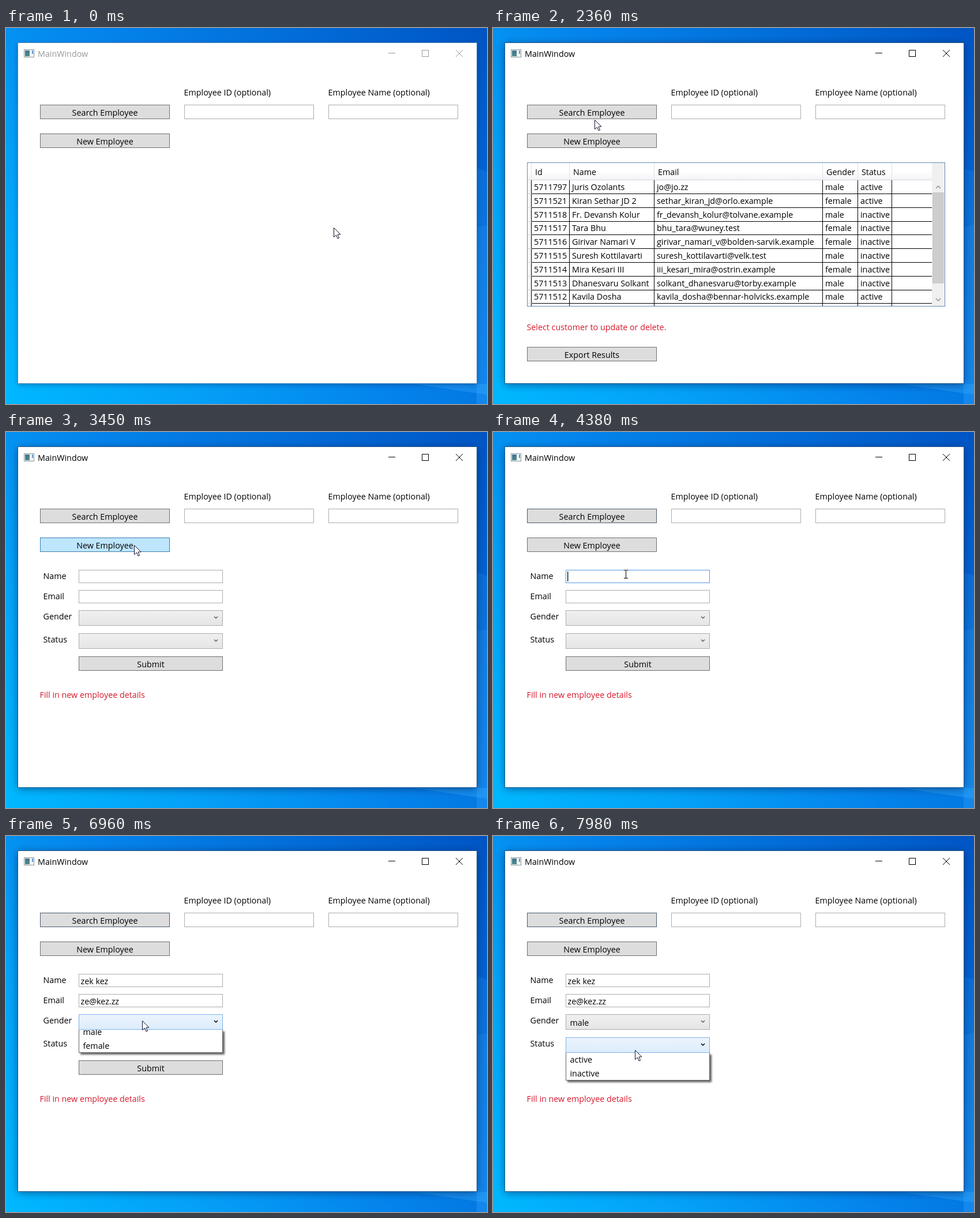
These frames come from a looping animation (834x652 px, 8 s). An HTML page with a canvas:

```html
<!DOCTYPE html>
<html lang="en">
<head>
<meta charset="utf-8">
<title>MainWindow</title>
<style>
html, body { margin: 0; width: 100%; height: 100%; overflow: hidden; }
canvas { display: block; }
</style>
</head>
<body>
<canvas id="stage" width="834" height="652"></canvas>
<script>
const ctx = document.getElementById('stage').getContext('2d');
const LOOP = 8000;
const RED = '#d6182b', GREY = '#707070';

// Pointer moves: start, end, steps, control point (or null), end point.
const START = [568, 346];
const MOVES = [
  [70, 620, 8, [400, -225], [160, 140]],
  [2360, 2710, 6, null, [220, 214]],
  [2910, 3050, 3, null, [222, 196]],
  [3980, 4260, 5, null, [230, 247]],
  [4790, 5130, 5, null, [236, 286]],
  [6420, 6490, 2, null, [236, 320]],
  [7030, 7160, 3, null, [240, 372]],
  [7230, 7300, 2, null, [241, 348]],
  [7500, 7700, 4, null, [246, 371]]
];
const SEARCH = [59, 133, 225, 25], CREATE = [59, 183, 225, 25];
const ID_BOX = [309, 133, 225, 25], NAME_FILTER = [559, 133, 225, 25];
const NAME = [126, 239, 250, 23], EMAIL = [126, 274, 250, 23];
const GENDER = [126, 309, 250, 27], STATUS = [126, 349, 250, 27];

const EMAIL_KEYS = [5420, 5500, 5580, 5660, 5740, 5940, 6010, 6220, 6290];
const COLUMNS = [132, 279, 571, 632, 691];
const TEXT_X = [71, 137, 284, 576, 637];
const ROWS = [
  [5711797, 'Juris Ozolants', 'jo@jo.zz', 'male', 'active'],
  [5711521, 'Kiran Sethar JD 2', 'sethar_kiran_jd@orlo.example', 'female', 'active'],
  [5711518, 'Fr. Devansh Kolur', 'fr_devansh_kolur@tolvane.example', 'male', 'inactive'],
  [5711517, 'Tara Bhu', 'bhu_tara@wuney.test', 'female', 'inactive'],
  [5711516, 'Girivar Namari V', 'girivar_namari_v@bolden-sarvik.example', 'female', 'inactive'],
  [5711515, 'Suresh Kottilavarti', 'suresh_kottilavarti@velk.test', 'male', 'inactive'],
  [5711514, 'Mira Kesari III', 'iii_kesari_mira@ostrin.example', 'female', 'inactive'],
  [5711513, 'Dhanesvaru Solkant', 'solkant_dhanesvaru@torby.example', 'male', 'inactive'],
  [5711512, 'Kavila Dosha', 'kavila_dosha@bennar-holvicks.example', 'male', 'active']
];

let pointer;

function pointerAt(t) {
  let from = START;
  for (const [start, end, steps, control, to] of MOVES) {
    if (t < start) break;
    const step = Math.min(steps, Math.floor((t - start) / (end - start) * (steps - 1)) + 1);
    const u = Math.sin(step / steps * Math.PI / 2), v = 1 - u;
    const mid = control || from.map((p, i) => (p + to[i]) / 2);
    from = from.map((p, i) => Math.round(v * v * p + 2 * u * v * mid[i] + u * u * to[i]));
  }
  const hidden = (t >= 4450 && t < 4790) || (t >= 5420 && t < 6420);
  return { x: from[0], y: from[1], hidden };
}

function over([x, y, w, h]) {
  return !pointer.hidden && pointer.x >= x && pointer.x < x + w && pointer.y >= y && pointer.y < y + h;
}

function gradient(x0, y0, x1, y1, ...colors) {
  const g = ctx.createLinearGradient(x0, y0, x1, y1);
  colors.forEach((c, i) => g.addColorStop(i / (colors.length - 1), c));
  return g;
}

function rect(x, y, w, h, fill) {
  ctx.fillStyle = fill;
  ctx.fillRect(x, y, w, h);
}

function frame([x, y, w, h], fill, border) {
  rect(x, y, w, h, border);
  rect(x + 1, y + 1, w - 2, h - 2, fill);
}

function text(value, x, y, color = '#000', align = 'left') {
  ctx.fillStyle = color;
  ctx.textAlign = align;
  ctx.fillText(value, x, y);
}

function shape(points, stroke, width = 1, fill) {
  ctx.beginPath();
  points.forEach(([x, y]) => ctx.lineTo(x, y));
  if (fill) {
    ctx.closePath();
    ctx.fillStyle = fill;
    ctx.fill();
  }
  if (stroke) {
    ctx.strokeStyle = stroke;
    ctx.lineWidth = width;
    ctx.stroke();
  }
}

function chevron(x, y, size, color, width) {
  shape([[x - Math.abs(size), y - size / 2], [x, y + size / 2], [x + Math.abs(size), y - size / 2]], color, width);
}

function button(box, label, pressed, border = GREY) {
  const hover = over(box);
  frame(box, pressed ? '#c4e5f6' : hover ? '#bee6fd' : '#ddd',
    pressed ? '#2c628b' : hover ? '#3c7fb1' : border);
  text(label, box[0] + box[2] / 2, box[1] + 19, '#000', 'center');
}

function textBox(box, value = '', focused = false) {
  const [x, y] = box;
  frame(box, '#fff', focused ? '#569de5' : over(box) ? '#7eb4ea' : '#abadb3');
  text(value, x + 3.5, y + 17.5);
  if (focused) rect(x + 3 + ctx.measureText(value).width, y + 3, 1.3, 17, '#000');
}

function comboBox(box, value = '') {
  const [x, y, w, h] = box, hover = over(box);
  const fill = hover ? gradient(0, y, 0, y + h, '#ecf4fc', '#dcecfc')
                     : gradient(0, y, 0, y + h, '#f0f0f0', '#e5e5e5');
  frame(box, fill, hover ? '#7eb4ea' : '#acacac');
  chevron(x + 238, y + 12.5, 3, hover ? '#000' : '#606060', 1.5);
  text(value, x + 7.5, y + 20);
}

// The list slides down from under its combo box.
function popup([x, y, w, h], items, t, opened) {
  const shown = Math.min(48, Math.floor((t - opened) / 70) * 20);
  if (shown <= 0) return;
  const top = y + h;
  ctx.save();
  ctx.beginPath();
  ctx.rect(x, top, w + 8, shown + 8);
  ctx.clip();
  ctx.shadowColor = 'rgba(0,0,0,.6)';
  ctx.shadowBlur = 3;
  ctx.shadowOffsetX = ctx.shadowOffsetY = 3;
  rect(x, top, w, shown, '#646464');
  ctx.restore();
  ctx.save();
  ctx.beginPath();
  ctx.rect(x + 1, top, w - 2, shown - 1);
  ctx.clip();
  rect(x, top, w, shown, '#fff');
  items.forEach((item, i) => {
    const itemTop = top + shown - 48 + i * 24;
    const row = [x + 1, itemTop, w - 2, 24];
    if (shown === 48 && over(row)) frame(row, '#e4f4fb', '#7cc5e8');
    text(item, x + 7.5, itemTop + 16.5);
  });
  ctx.restore();
}

function desktop() {
  rect(0, 0, 834, 652, gradient(0, 652, 834, 0, '#00b8ff', '#04a0f7', '#0483ec', '#026cd8', '#0054c4'));
  const glow = 'rgba(60,170,255,.16)';
  shape([[816, 243], [834, 249], [834, 652], [816, 652]], null, 0, glow);
  shape([[816, 345], [834, 342], [834, 652], [816, 652]], null, 0, glow);
  shape([[705, 617], [834, 617], [834, 636]], null, 0, 'rgba(60,180,255,.3)');
}

function windowFrame(active) {
  const ink = active ? '#000' : '#999';
  ctx.save();
  ctx.shadowColor = `rgba(0,20,60,${active ? 0.55 : 0.4})`;
  ctx.shadowBlur = active ? 14 : 9;
  ctx.shadowOffsetY = 2;
  rect(21, 26, 795, 590, '#fff');
  ctx.restore();
  ctx.lineWidth = 1;
  ctx.strokeStyle = active ? '#1c568c' : '#4687bd';
  ctx.strokeRect(20.5, 25.5, 796, 591);

  frame([31, 37, 18, 14], '#f4f6f8', '#8b959c');
  rect(33, 39, 8, 10, gradient(33, 39, 41, 49, '#3e6f93', '#4d8f87'));
  rect(45, 39, 2, 6, '#5c8fc0');
  text('MainWindow', 55, 50, ink);
  rect(663, 43, 12, 1, ink);
  ctx.strokeStyle = ink;
  ctx.strokeRect(721.5, 38.5, 11, 11);
  shape([[780, 38], [792, 50]], ink);
  shape([[792, 38], [780, 50]], ink);
}

function table() {
  frame([59, 233, 725, 250], '#fff', '#688caf');
  rect(60, 234, 701, 29, gradient(0, 234, 0, 263, '#fff', '#fff', '#f3f4f7'));
  rect(60, 263, 7, 219, '#f5f6f8');
  ['Id', 'Name', 'Email', 'Gender', 'Status'].forEach((title, i) => text(title, TEXT_X[i] + 2, 255));
  rect(60, 263, 701, 1, '#d5d5d5');
  [66, ...COLUMNS].forEach(x => {
    rect(x, 234, 1, 29, '#dde1e6');
    rect(x, 264, 1, 218, '#000');
  });
  ROWS.forEach((row, i) => {
    row.forEach((cell, c) => text(cell, TEXT_X[c], 281 + i * 23.8));
    const y = Math.round(287 + i * 23.8);
    rect(67, y, 694, 1, '#000');
    rect(60, y, 7, 1, '#d5d5d5');
  });
  rect(761, 234, 22, 248, '#f0f0f0');
  rect(762, 285, 20, 158, '#cdcdcd');
  chevron(772, 276, -4, '#8a8a8a', 1.3);
  chevron(772, 471, 4, '#8a8a8a', 1.3);
  text('Select customer to update or delete.', 58.5, 524, RED);
  button([59, 553, 225, 25], 'Export Results');
}

function form(t) {
  text('Name', 64.5, 255);
  text('Email', 64.5, 290);
  text('Gender', 64.5, 325);
  text('Status', 64.5, 365);
  const nameLength = t < 4450 ? 0 : 2 * (Math.floor((t - 4450) / 70) + 1);
  const emailLength = EMAIL_KEYS.filter(key => key <= t).length;
  textBox(NAME, 'zek kez'.slice(0, nameLength), t >= 4260 && t < 5350);
  textBox(EMAIL, 'ze@kez.zz'.slice(0, emailLength), t >= 5350 && t < 6690);
  comboBox(GENDER, t >= 7500 ? 'male' : '');
  if (t >= 7500 || !over(STATUS) || t < 7030) comboBox(STATUS);
  button([126, 389, 250, 25], 'Submit');
  text('Fill in new employee details', 58.5, 461, RED);
  if (t < 7500) popup(GENDER, ['male', 'female'], t, 6820);
  popup(STATUS, ['active', 'inactive'], t, 7770);
}

function drawPointer(formOpen) {
  if (pointer.hidden) return;
  const { x, y } = pointer;
  const fields = [ID_BOX, NAME_FILTER, ...(formOpen ? [NAME, EMAIL] : [])];
  if (fields.some(over)) {
    rect(x, y - 7, 1, 14, '#000');
    [-8, 6].forEach(dy => {
      rect(x - 3, y + dy, 3, 1, '#000');
      rect(x + 1, y + dy, 3, 1, '#000');
    });
    return;
  }
  const arrow = [[0, 0], [0, 16], [4, 12.5], [6.5, 18.5], [9, 17.5], [6.5, 11.5], [11.5, 11.5], [0, 0]];
  shape(arrow.map(([dx, dy]) => [x + 0.5 + dx, y + 0.5 + dy]), '#10102e', 1, '#fff');
}

function draw() {
  const t = performance.now() % LOOP;
  const formOpen = t >= 3380;
  pointer = pointerAt(t);
  ctx.font = '14.3px "Open Sans", sans-serif';

  desktop();
  windowFrame(t >= 890);
  text('Employee ID (optional)', 308.5, 117);
  text('Employee Name (optional)', 558.5, 117);
  button(SEARCH, 'Search Employee', t >= 890 && t < 1010, t >= 4260 ? '#4b5b70' : GREY);
  button(CREATE, 'New Employee', t >= 3250 && t < 3380);
  textBox(ID_BOX);
  textBox(NAME_FILTER);

  if (formOpen) form(t);
  else if (t >= 2360) table();
  else if (t >= 1080) text('Loading ...', 58.5, 287, RED);

  drawPointer(formOpen);
  requestAnimationFrame(draw);
}
draw();
</script>
</body>
</html>
```
